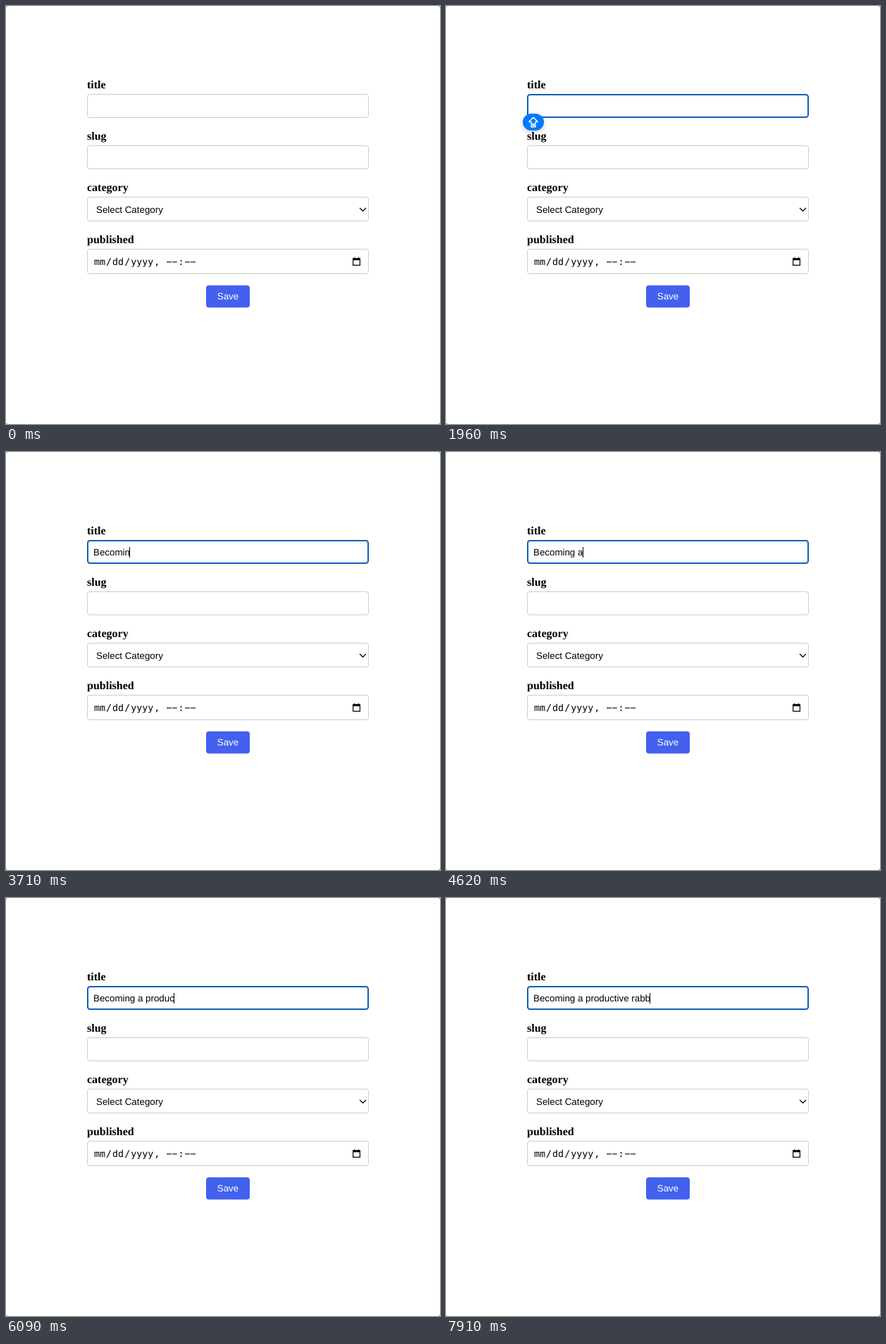
An HTML page that plays this animation: 616x594 px, repeating every 8 s.

```html
<!DOCTYPE html>
<html lang="en">
<head>
<meta charset="utf-8">
<title>Form</title>
<style>
  html, body { margin: 0; width: 100%; height: 100%; overflow: hidden; background: #fff; }
  svg { display: block; width: 100%; height: 100%; }
  text { font: 13.333px Arial, "Liberation Sans", sans-serif; text-rendering: geometricPrecision; white-space: pre; }
  .label text { font: bold 16px "Liberation Serif", Times, serif; }
  .date text { font-family: "DejaVu Sans Mono", monospace; }
  .box rect { fill: #fff; stroke: #ccc; }
  .line { fill: none; stroke: #000; stroke-width: 1.2; }
</style>
</head>
<body>
<svg viewBox="0 0 616 594">
  <path fill="#999" d="M0 0h2L0 2zM616 0v2l-2-2zM0 594v-2l2 2zM616 594h-2l2-2z"/>
  <g class="label">
    <text x="115" y="117">title</text>
    <text x="115" y="190">slug</text>
    <text x="115" y="263">category</text>
    <text x="115" y="337">published</text>
  </g>
  <g class="box">
    <rect x="115.5" y="125.5" width="399" height="33" rx="3.5"/>
    <rect x="115.5" y="198.5" width="399" height="33" rx="3.5"/>
    <rect x="115.5" y="271.5" width="399" height="34" rx="3.5"/>
    <rect x="115.5" y="345.5" width="399" height="35" rx="3.5"/>
  </g>
  <rect id="ring" x="116" y="126" width="398" height="32" rx="3.5" fill="none" stroke="#0f60b8" stroke-width="2"/>
  <text id="typed" x="124" y="147"></text>
  <rect id="caret" y="135" width="1" height="15"/>

  <text x="128" y="294">Select Category</text>
  <path class="line" d="M502 287l4.5 4.3 4.5-4.3"/>

  <g class="date" id="date"></g>
  <path class="line" d="M492.6 359.1h9.8v9.3h-9.8z"/>
  <path d="M492 358.5h11v2.8h-11zM494 357.3h1.3v2H494zM499.7 357.3h1.3v2h-1.3z"/>

  <rect x="284" y="397" width="62" height="31.5" rx="4" fill="#4361ee"/>
  <text x="299.8" y="417" fill="#fff">Save</text>

  <g id="badge">
    <rect x="109" y="153" width="30" height="24" rx="12" fill="#007aff" style="filter:drop-shadow(0 2px 3px #0003)"/>
    <path fill="none" stroke="#fff" stroke-width="1.4" stroke-linejoin="round"
      d="M124 158.3l6.3 6.2h-3.2v3.2h-6.2v-3.2h-3.2zM120.9 169.6h6.2v2.1h-6.2z"/>
  </g>
</svg>
<script>
const $ = id => document.getElementById(id);
const show = (id, on) => $(id).setAttribute('visibility', on ? 'visible' : 'hidden');

const LOOP = 8000, FOCUS = 980;
const phrase = 'Becoming a productive rabb';
// time at which each letter is typed
const keys = [2100, 2730, 2870, 3080, 3290, 3500, 3710, 3920, 4130, 4620, 4760, 5110, 5250,
  5460, 5810, 5950, 6090, 6370, 6510, 6650, 6930, 7070, 7420, 7700, 7840, 7910];
const within = (t, a, b) => t >= a && t < b;

// date fields are set apart by one pixel
let x = 125;
for (const part of ['mm', '/', 'dd', '/', 'yyyy', ', ', '−−', ':', '−−']) {
  $('date').innerHTML += `<text x="${x}" y="368">${part}</text>`;
  x += part.length * 8.027 + 1;
}

function draw(t) {
  const count = keys.filter(k => k <= t).length;
  const typed = $('typed');
  typed.textContent = phrase.slice(0, count);
  const width = count ? typed.getComputedTextLength() : 0;
  $('caret').setAttribute('x', Math.floor(124 + width));
  show('ring', t >= FOCUS);
  show('caret', t >= FOCUS && !within(t, 1540, 2100) && !within(t, 2590, 2730));
  show('badge', within(t, 1960, 2100));
}

const start = performance.now();
function tick() {
  draw((performance.now() - start) % LOOP);
  requestAnimationFrame(tick);
}
tick();
</script>
</body>
</html>
```
